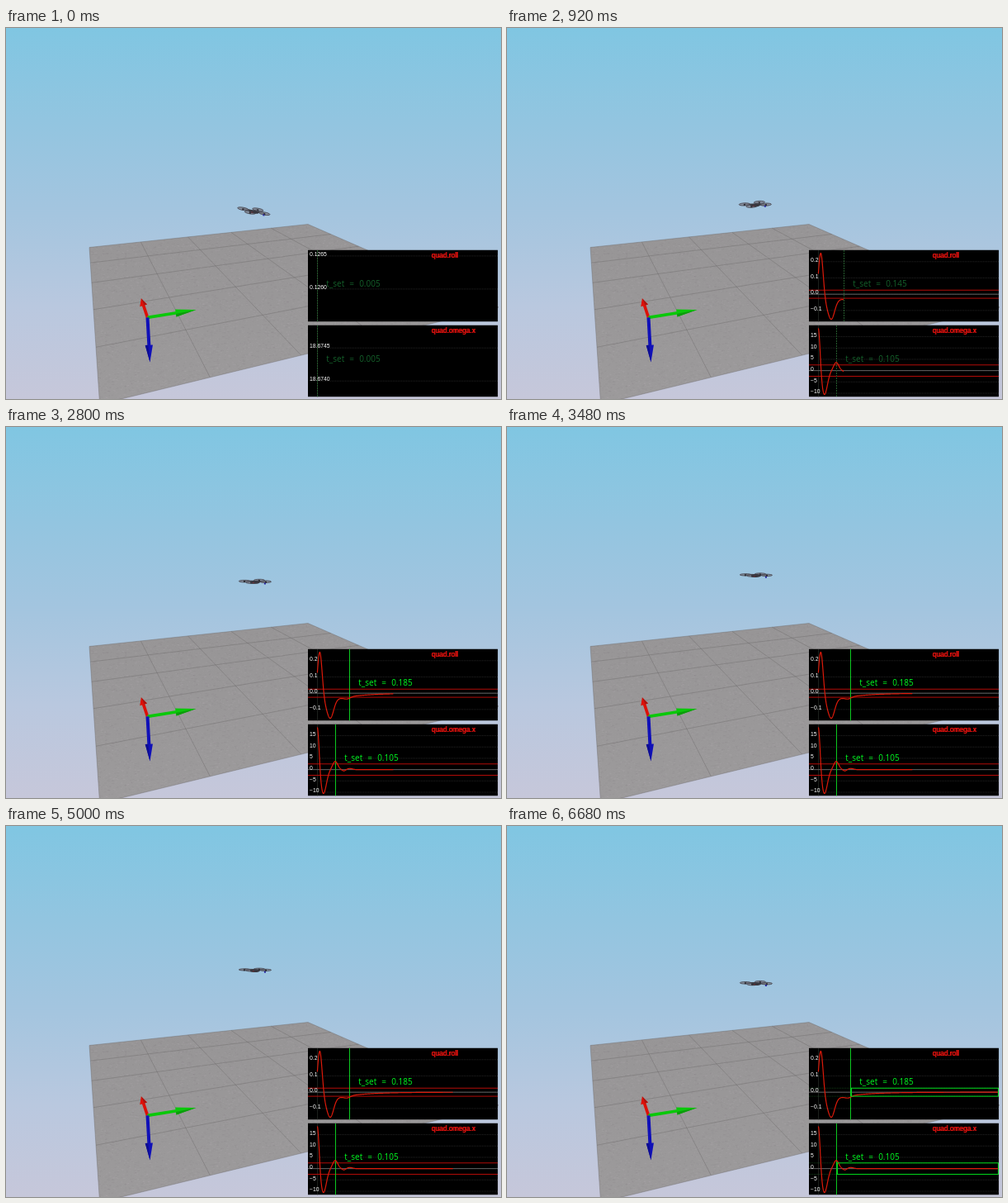
Recreate the animation shown at these times as an HTML page with a canvas. Size 600 px wide and 449 px high, loop 6.72 s.

```html
<!DOCTYPE html>
<html lang="en">
<head>
<meta charset="utf-8">
<title>Quadrotor step response</title>
<style>
html, body { margin: 0; width: 100%; height: 100%; overflow: hidden; background: #a3c5de; }
canvas { display: block; width: 600px; height: 449px; }
</style>
</head>
<body>
<canvas id="stage" width="600" height="449"></canvas>
<script>
const W = 600, H = 449, LOOP = 6720, STEP = 40;
const ctx = document.getElementById('stage').getContext('2d');

// Gaussian pulse centred on c with spread s.
const pulse = (t, amp, c, s) => amp * Math.exp(-((t - c) ** 2) / (2 * s * s));

// Kick, counter-swing, then a slow exponential return to level.
const roll = t => pulse(t, 0.32314, 0.018, 0.0135) - pulse(t, 0.108, 0.077, 0.018) -
  pulse(t, 0.012, 0.17, 0.018) - 0.08 * Math.exp(-7.2 * t);

// Alternating, shrinking swings.
const omega = t => pulse(t, 20.02387, 0.005, 0.00988) - pulse(t, 10.6, 0.0385, 0.0165) +
  pulse(t, 3.6, 0.104, 0.014) - pulse(t, 0.6, 0.152, 0.009) + pulse(t, 0.5, 0.185, 0.014);

const height = sec => 173.5 + 25 * (1 - Math.cos(0.6 * (sec - 4.62)));

const timeX = s => 376.3 + 219 * s;

const plots = [
  { name: 'quad.roll', top: 269, band: 0.025, settle: 0.185, value: roll },
  { name: 'quad.omega.x', top: 360, band: 2.5, settle: 0.105, value: omega }
];

function poly(c, pts, fill) {
  c.beginPath();
  pts.forEach(p => c.lineTo(p[0], p[1]));
  c.closePath();
  c.fillStyle = fill;
  c.fill();
}

function line(c, x1, y1, x2, y2, color, width = 1, dash = []) {
  c.beginPath();
  c.moveTo(x1, y1);
  c.lineTo(x2, y2);
  c.strokeStyle = color;
  c.lineWidth = width;
  c.setLineDash(dash);
  c.stroke();
  c.setLineDash([]);
}

// Perspective map of the unit square onto four screen corners.
function perspective([ax, ay], [bx, by], [cx, cy], [dx, dy]) {
  const px = bx - cx, qx = dx - cx, sx = ax - bx + cx - dx;
  const py = by - cy, qy = dy - cy, sy = ay - by + cy - dy;
  const det = px * qy - qx * py;
  const g = (sx * qy - qx * sy) / det, h = (px * sy - sx * py) / det;
  return (u, v) => {
    const w = 1 + g * u + h * v;
    return [(ax + (bx * (1 + g) - ax) * u + (dx * (1 + h) - ax) * v) / w,
            (ay + (by * (1 + g) - ay) * u + (dy * (1 + h) - ay) * v) / w];
  };
}

const floor = perspective([101, 265.5], [366, 237.5], [597, 338], [113.6, 455.3]);

// Arrow with a conical head; the far side of the cone is shaded.
function arrow(c, x, y, tipX, tipY, headLen, shaft, color, shade) {
  const len = Math.hypot(tipX - x, tipY - y);
  c.save();
  c.translate(x, y);
  c.rotate(Math.atan2(tipY - y, tipX - x));
  line(c, 0, 0, len - headLen + 1, 0, color, shaft);
  poly(c, [[len - headLen, -4.6], [len - headLen, 4.6], [len, 0]], color);
  poly(c, [[len - headLen, 1], [len - headLen, 4.6], [len, 0]], shade);
  c.restore();
}

function drawScene(c) {
  const sky = c.createLinearGradient(0, 0, 0, H);
  ['#80c6e2', '#92c5e0', '#a4c5df', '#b9c8df', '#c6c7da']
    .forEach((color, i) => sky.addColorStop(i / 4, color));
  c.fillStyle = sky;
  c.fillRect(0, 0, W, H);

  const ground = c.createLinearGradient(0, 240, 0, H);
  ground.addColorStop(0, '#979596');
  ground.addColorStop(1, '#9c9a9b');
  poly(c, [floor(0, 0), floor(1, 0), floor(1, 1), floor(0, 1)], ground);

  c.save();
  c.clip();
  let seed = 7;
  const rnd = () => (seed = seed * 16807 % 2147483647) / 2147483647;
  for (let i = 0; i < 9000; i++) {
    const x = 100 + 500 * rnd(), y = 236 + 214 * rnd();
    c.fillStyle = rnd() < 0.5 ? 'rgba(190,188,190,.13)' : 'rgba(115,112,114,.1)';
    c.fillRect(x, y, 1 + 2 * rnd(), 1);
  }
  c.restore();

  for (let i = 0; i <= 5; i++) {
    const k = i / 5, color = 'rgba(105,102,104,.5)';
    line(c, ...floor(k, 0), ...floor(k, 1), color, 0.8);
    line(c, ...floor(0, k), ...floor(1, k), color, 0.8);
  }

  arrow(c, 171.5, 350.4, 163.8, 327.3, 9, 3.6, '#dc1008', '#a81410');
  arrow(c, 171.5, 350.4, 230.5, 341, 25, 3.6, '#0ac80a', '#0c9c0c');
  arrow(c, 171.5, 350.4, 174.5, 404.6, 21, 4, '#1010b8', '#0c0c90');
}

function drawDrone(sec) {
  const y = height(sec), k = 0.35 + (y - 173.5) * 0.015;
  const slope = roll(0.005 + sec * 0.15) * 1.3;
  ctx.save();
  ctx.translate(300.3 + Math.min(1.6, sec * 0.6), y);
  ctx.transform(1, slope, 0, 1, 0, 0);
  const rotors = [[5, -2.6 * k], [-13, -0.8 * k], [13, 0.6 * k], [-4.5, 2 * k]];
  line(ctx, ...rotors[1], ...rotors[2], '#3c3c42', 2);
  line(ctx, ...rotors[0], ...rotors[3], '#3c3c42', 2);
  rotors.forEach(([x, dy]) => {
    ctx.beginPath();
    ctx.ellipse(x, dy, 6.6, 0.8 + 0.8 * k, 0, 0, 7);
    ctx.fillStyle = 'rgba(128,130,142,.8)';
    ctx.fill();
    ctx.strokeStyle = '#4a4b55';
    ctx.lineWidth = 0.9;
    ctx.stroke();
    ctx.fillStyle = '#2c2c33';
    ctx.fillRect(x - 1, dy - 0.5, 2, 2);
  });
  ctx.beginPath();
  ctx.ellipse(0, 0.9, 6, 1.9, 0, 0, 7);
  ctx.fillStyle = '#38373f';
  ctx.fill();
  ctx.fillStyle = '#703038';
  ctx.fillRect(-3, 1, 2, 1);
  ctx.fillStyle = '#2828a0';
  ctx.fillRect(11, 1.6, 2, 2);
  ctx.restore();
}

function text(str, x, y, font, color) {
  ctx.font = font;
  ctx.fillStyle = color;
  ctx.fillText(str, x, y);
}

// Smallest 1-or-5 step whose lines are at least 12 px apart.
function tickStep(scale) {
  for (let e = -4; ; e++) {
    for (const n of [1, 5]) {
      const step = n * 10 ** e;
      if (step * scale >= 12) return { step, digits: Math.max(0, -e) };
    }
  }
}

function drawPlot({ name, top, band, settle, value }, now) {
  const left = 366, right = 596, bottom = top + 86.5;
  const pts = [];
  for (let t = 0.005; t < now + 0.0005; t += 0.001) pts.push([timeX(t), value(t)]);
  const values = pts.map(p => p[1]);
  let min = Math.min(...values), max = Math.max(...values);
  const pad = Math.max(0, 0.001 - (max - min)) / 2;
  min -= pad;
  max += pad;
  const scale = 80 / (max - min);
  const toY = v => top + 3.5 + (max - v) * scale;

  const set = Math.min(now, settle);
  const done = now - set > 0.0999, boxed = now - set > 0.6999;
  const setX = Math.floor(timeX(set)) + 0.5;

  ctx.save();
  ctx.beginPath();
  ctx.rect(left, top - 0.5, right - left + 0.3, 87);
  ctx.clip();
  ctx.fillStyle = '#000';
  ctx.fill();

  const { step, digits } = tickStep(scale);
  const ticks = [];
  const last = Math.floor((max + 3 / scale) / step);
  for (let i = Math.ceil((min - 3 / scale) / step); i <= last; i++) ticks.push(i * step);
  ticks.forEach(v => line(ctx, 377, toY(v), right, toY(v), '#242424', 1, [1, 1]));
  line(ctx, 377.5, top, 377.5, bottom, '#1c201c');
  line(ctx, left, toY(0), right, toY(0), '#626262');

  [band, -band].forEach(b => {
    if (boxed) line(ctx, left, toY(b), right, toY(b), '#123c16', 1, [1, 1]);
    else line(ctx, left, toY(b), right, toY(b), '#b40c08');
  });

  line(ctx, setX, top, setX, bottom, done ? '#0cc820' : '#245a2c', 1, done ? [] : [2, 1]);

  ctx.beginPath();
  pts.forEach(([x, v]) => ctx.lineTo(x, toY(v)));
  ctx.strokeStyle = '#dc1a0a';
  ctx.lineWidth = 1.2;
  ctx.stroke();

  if (boxed) {
    const end = Math.min(timeX(now), right - 0.5);
    ctx.strokeStyle = '#00d81c';
    ctx.lineWidth = 1;
    ctx.strokeRect(setX + 1, toY(band), end - setX - 1, 2 * band * scale);
  }

  const tickFont = '6.8px "Liberation Sans", Arial, sans-serif';
  ticks.forEach(v => {
    const label = (Math.abs(v) < step / 2 ? 0 : v).toFixed(digits).replace('-', '\u2212');
    text(label, 368, toY(v) + 0.3, tickFont, '#fff');
  });

  const titleFont = '8.4px "Liberation Sans", Arial, sans-serif';
  [515.5, 516.3].forEach(x => text(name, x, top + 9.3, titleFont, '#f81410'));

  ctx.wordSpacing = '3.5px';
  text('t_set = ' + set.toFixed(3), setX + 10.8, top + 43.7,
    '10px "Open Sans", sans-serif', done ? '#00f820' : '#14602a');
  ctx.restore();
}

const scene = document.createElement('canvas');
scene.width = W;
scene.height = H;
drawScene(scene.getContext('2d'));

function draw(ms) {
  const frame = Math.floor((ms % LOOP) / STEP);
  const now = 0.005 * Math.round(1 + frame * 1.2);
  ctx.drawImage(scene, 0, 0);
  drawDrone(frame * STEP / 1000);
  plots.forEach(p => drawPlot(p, now));
}

let start;
function tick(t) {
  if (start === undefined) start = t;
  draw(t - start);
  requestAnimationFrame(tick);
}
draw(0);
requestAnimationFrame(tick);
</script>
</body>
</html>
```
